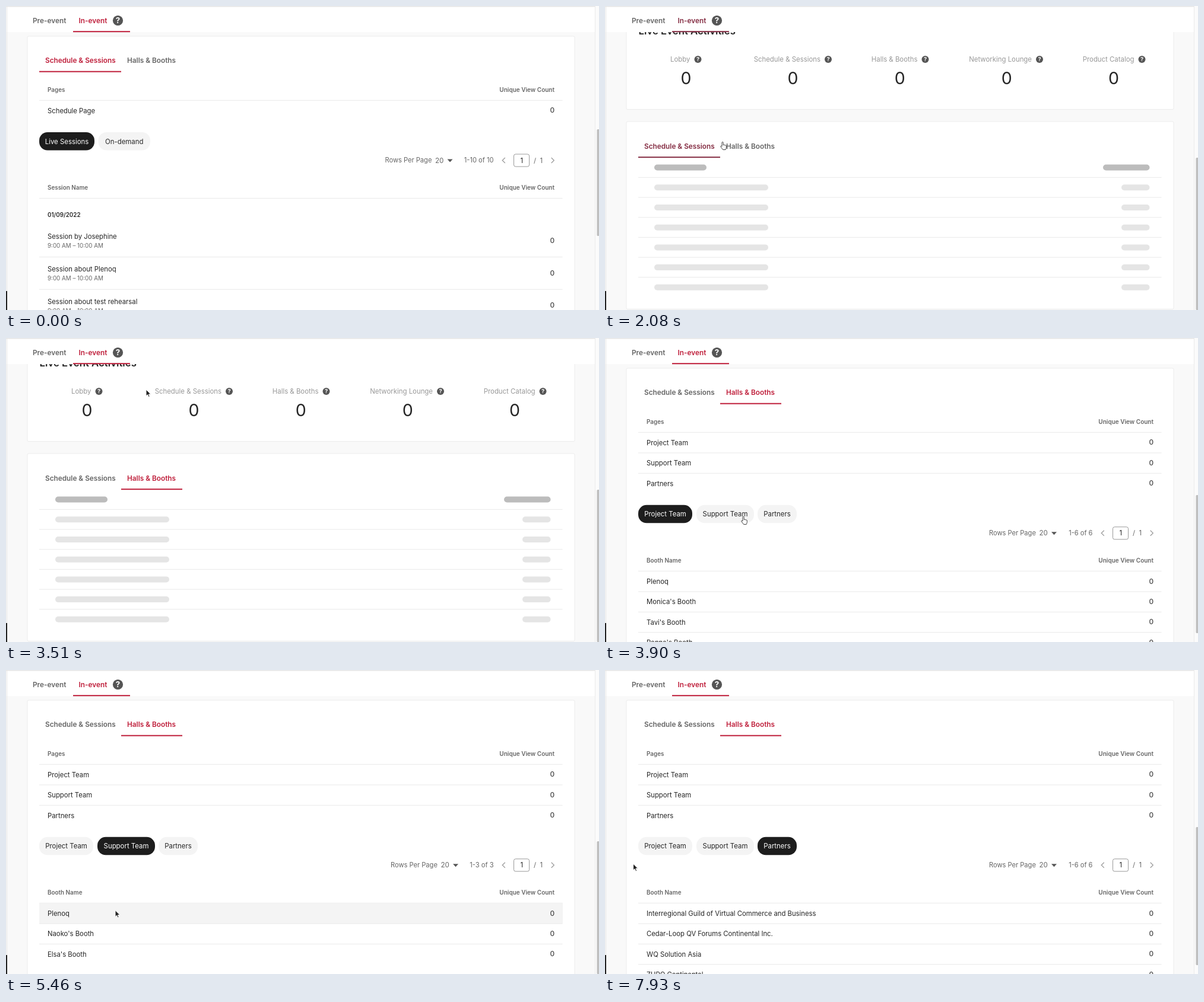
Animation of 999x513 px, one loop 8000 ms. Source, as an HTML page:

```html
<!DOCTYPE html>
<html lang="en">
<head>
<meta charset="utf-8">
<title>Event report</title>
<style>
  html, body { margin: 0; width: 100%; height: 100%; overflow: hidden; background: #fff; }
  svg { display: block; width: 999px; height: 513px; font-family: Inter, sans-serif; }
</style>
</head>
<body>
<svg viewBox="0 0 999 513"><g id="page"></g><path id="cursor" stroke-linejoin="round"/></svg>
<script>
const LOOP = 8000, STEP = 130;
const RED = '#bf1f3b', INK = '#262626', GREY = '#666', RULE = '#e9e9e9';
const page = document.getElementById('page');
const cursor = document.getElementById('cursor');

const SCHEDULE = {
  tab: 0, pages: ['Schedule Page'], chips: [['Live Sessions', 56, 93], ['On-demand', 155.5, 87.5]],
  head: 'Session Name',
};
const HALLS = {
  tab: 1, pages: ['Project Team', 'Support Team', 'Partners'],
  chips: [['Project Team', 56, 91], ['Support Team', 154, 97], ['Partners', 257, 66]],
  head: 'Booth Name',
};
const LIVE = {
  ...SCHEDULE, chip: 0, range: '1-10 of 10', shift: 0, thumb: [208, 388], hours: '9:00 AM – 10:00 AM',
  rows: ['Session by Josephine', 'Session about Plenoq', 'Session about test rehearsal'],
};
const ON_DEMAND = {
  ...SCHEDULE, chip: 1, range: '1-2 of 2', shift: 10, thumb: [293, 513], hours: '9:00 AM – 11:00 AM',
  rows: ['Plenoq live streaming webinar', 'Plenoq'], bottom: 511.5,
};
const PROJECT = {
  ...HALLS, chip: 0, range: '1-6 of 6', shift: 8.5, thumb: [265, 498],
  rows: ['Plenoq', "Monica's Booth", "Tavi's Booth", "Ronna's Booth"],
};
const SUPPORT = {
  ...HALLS, chip: 1, range: '1-3 of 3', shift: 9.5, thumb: [289, 513],
  rows: ['Plenoq', "Naoko's Booth", "Elsa's Booth"],
};
const PARTNERS = {
  ...PROJECT, chip: 2,
  rows: ['Interregional Guild of Virtual Commerce and Business', 'Cedar-Loop QV Forums Continental Inc.',
    'WQ Solution Asia', 'ZUPQ Continental'],
};
const loading = (tab, accent = RED) => ({ tab, accent, skeleton: true, thumb: [256, 513] });

// [start time, view]
const VIEWS = [
  [0, LIVE], [2080, loading(0, '#842c42')], [2340, ON_DEMAND], [3510, loading(1)], [3770, PROJECT],
  [4030, loading(1)], [4290, SUPPORT], [6630, loading(1)], [7020, PARTNERS],
];
// [time, x, y, hand pointer]
const MOVES = [
  [1170, 340, 284, 0], [1430, 262, 262, 0], [1690, 212, 238, 1], [1950, 198, 229, 1], [2600, 198, 229, 0],
  [2860, 234, 84, 1], [3510, 236, 87, 0], [3640, 236, 130, 0], [3900, 233, 301, 1], [5200, 233, 301, 0],
  [5460, 184, 405.5, 0], [5720, 232, 352, 0], [5980, 262, 330, 0], [6240, 262, 330, 0], [6370, 297, 303, 1],
  [6630, 297, 303, 0], [7020, 297, 303, 1], [7670, 297, 303, 0], [7930, 47.5, 327, 0],
];
const HAND = 'M3 8V1.5a1.1 1.1 0 0 1 2.2 0V5.5q1-.7 1.9.2q1-.6 1.8.4q1.2-.3 1.4.9V9.5q0 2-1.2 4H4.6Q3 11 .8 8.6q-.3-1.5 1-1.4z';
const ARROW = 'M0 0V11l2.6-2.4 1.7 3.9 1.9-.8-1.7-3.8H8z';

const rect = (x, y, w, h, fill, extra = '') =>
  `<rect x="${x}" y="${y}" width="${w}" height="${h}" fill="${fill}" ${extra}/>`;
const rule = y => rect(56, y - .5, 881.5, 1, RULE);
const text = (x, mid, str, size = 11.3, fill = INK, weight = 400, anchor = 'start') =>
  `<text x="${x}" y="${mid + size * .36}" font-size="${size}" fill="${fill}" font-weight="${weight}" ` +
  `text-anchor="${anchor}">${str.replace('&', '&amp;')}</text>`;
const bold = (x, mid, str, fill = GREY, size = 11.8) => text(x, mid, str, size, fill, 600);
const help = (x, y, r) =>
  `<circle cx="${x}" cy="${y}" r="${r}" fill="#555"/>` + text(x, y, '?', r * 1.55, '#fff', 700, 'middle');
const zero = mid => text(924, mid, '0', 11.8, '#444', 500, 'end');
const card = (y, h) => rect(36, y, 922, h, '#fff', 'stroke="#ececec" rx="2"');
const tableHead = (mid, name) =>
  bold(70, mid, name, GREY, 9.9) + text(924, mid, 'Unique View Count', 10, GREY, 600, 'end') + rule(mid + 18);

function tabs(active, mid, accent) {
  const [x, w] = active ? [194, 103] : [56, 138];
  return bold(66, mid, 'Schedule & Sessions', active ? GREY : accent) +
    bold(204, mid, 'Halls & Booths', active ? accent : GREY) + rect(x, mid + 17.7, w, 2, accent);
}

function header(accent) {
  return rect(0, 0, 993, 44, '#fff') + rect(0, 0, 999, 1.5, '#e6e6e6') +
    bold(45, 24.5, 'Pre-event') + bold(122.5, 24.5, 'In-event', accent) +
    help(188.5, 24.5, 8.6) + rect(113, 42.2, 96, 2, accent);
}

function skeleton({ tab, accent }) {
  const stats = [['Lobby', 156.5], ['Schedule & Sessions', 376], ['Halls & Booths', 539.5],
    ['Networking Lounge', 732], ['Product Catalog', 904.5]];
  const bar = (x, mid, w, fill) => rect(x, mid - 5, w, 10, fill, 'rx="5"');
  let out = card(30, 144.5) + card(195, 316.5) + bold(56.5, 42, 'Live Event Activities', INK, 16.8);
  stats.forEach(([name, icon], i) => {
    out += text(icon - 13, 90, name, 11.4, '#999', 400, 'end') + help(icon, 90, 6) +
      text(136.5 + i * 180.1, 122, '0', 28.5, INK, 400, 'middle');
  });
  out += tabs(tab, 236.5, accent) + bar(83, 272.5, 88, '#bcbcbc') + bar(839, 272.5, 78.5, '#bcbcbc');
  for (let i = 0; i < 6; i++) {
    const mid = 306.3 + i * 33.7;
    out += rule(mid - 17) + bar(83, mid, 192, '#e5e5e5') + bar(870, mid, 47.5, '#e5e5e5');
  }
  return out;
}

function pager(mid, range, shift) {
  const chevron = (x, d) =>
    `<path d="M${x - d} ${mid - 4.5}l${2 * d} 4.5l${-2 * d} 4.5" fill="none" stroke="#999" stroke-width="1.2"/>`;
  const caret = 743.5 + shift;
  return text(638.5 + shift, mid, 'Rows Per Page', 11.1, GREY) + text(723 + shift, mid, '20', 11.6, GREY) +
    `<path d="M${caret} ${mid - 2}h9l-4.5 5z" fill="#555"/>` +
    text(821.5, mid, range, 11.1, GREY, 400, 'end') + chevron(838.5, -2.3) +
    rect(855.5, mid - 10.5, 26, 21, '#fff', 'stroke="#999" rx="3"') +
    text(868.8, mid, '1', 11.3, INK, 400, 'middle') + text(889, mid, '/', 11.3, GREY) +
    text(904, mid, '1', 11.3, GREY, 400, 'end') + chevron(921, 2.3);
}

function report(view, hover) {
  const { tab, pages, chips, rows, hours } = view;
  const drop = (pages.length - 1) * 34.4;
  let out = card(51, (view.bottom || 530) - 51) + tabs(tab, 92, RED) + tableHead(141.3, 'Pages');
  pages.forEach((name, i) => {
    const mid = 176.7 + i * 34.4;
    out += text(70, mid, name) + zero(mid - .7) + (i ? rule(mid - 17.2) : '');
  });
  chips.forEach(([name, x, w], i) => {
    const on = i === view.chip;
    out += rect(x, 213 + drop, w, 30.5, on ? '#1d1d1d' : '#f4f4f4', 'rx="14"') +
      text(x + w / 2, 228.5 + drop, name, 11.4, on ? '#fff' : INK, 400, 'middle');
  });
  out += pager(260.5 + drop, view.range, view.shift) + tableHead(306.5 + drop, view.head);
  if (hours) out += bold(70, 352.5, '01/09/2022', INK, 9.8);
  rows.forEach((name, i) => {
    if (hours) {
      const top = 389.3 + i * 54.6;
      out += text(70, top, name) + text(70, top + 15.5, hours, 9.8, GREY) + zero(top + 6.5);
      if (i < rows.length - 1) out += rule(top + 34.3);
    } else {
      const mid = 411 + i * 34.4;
      if (i === hover) out += rect(56, mid - 17.5, 882, 34.5, '#f4f4f4');
      out += text(70, mid, name) + zero(mid - .7);
      if (i < rows.length - 1) out += rule(mid + 17);
    }
  });
  return out;
}

function draw(view, hover) {
  const [top, end] = view.thumb;
  page.innerHTML = rect(0, 0, 999, 513, '#f9f9f9') +
    (view.skeleton ? skeleton(view) : report(view, hover)) + header(view.accent || RED) +
    rect(1, 0, 1, 513, '#e6e6e6') + rect(992, 0, 7, 513, '#fbfbfb') + rect(992, 0, 1, 513, '#ebebeb') +
    rect(995.5, top, 4, end - top, '#bfbfbf', 'rx="1.5"') + rect(0, 481, 2, 32, '#222');
}

function pointerAt(t) {
  const i = MOVES.findLastIndex(m => m[0] <= t);
  if (i < 0) return null;
  const [t0, x0, y0, hand] = MOVES[i];
  const [t1, x1, y1] = MOVES[i + 1] || [t0 + 1, x0, y0];
  const k = (t - t0) / (t1 - t0);
  return { x: x0 + (x1 - x0) * k, y: y0 + (y1 - y0) * k, hand };
}

let shown;
function tick() {
  const t = Math.floor(performance.now() % LOOP / STEP) * STEP;
  const index = VIEWS.findLastIndex(v => v[0] <= t);
  const view = VIEWS[index][1];
  const p = pointerAt(t);
  const hover = p && p.x > 56 && view.tab === 1 && !view.skeleton
    ? Math.max(-1, Math.floor((p.y - 393.5) / 34.4)) : -1;
  const key = index + ':' + hover;
  if (key !== shown) draw(view, hover);
  shown = key;
  cursor.style.display = p ? '' : 'none';
  if (p) {
    cursor.setAttribute('d', p.hand ? HAND : ARROW);
    cursor.setAttribute('fill', p.hand ? '#fff' : '#222');
    cursor.setAttribute('stroke', p.hand ? '#444' : '#fff');
    cursor.setAttribute('transform', `translate(${p.hand ? p.x - 4 : p.x} ${p.y})`);
  }
  requestAnimationFrame(tick);
}
tick();
</script>
</body>
</html>
```
